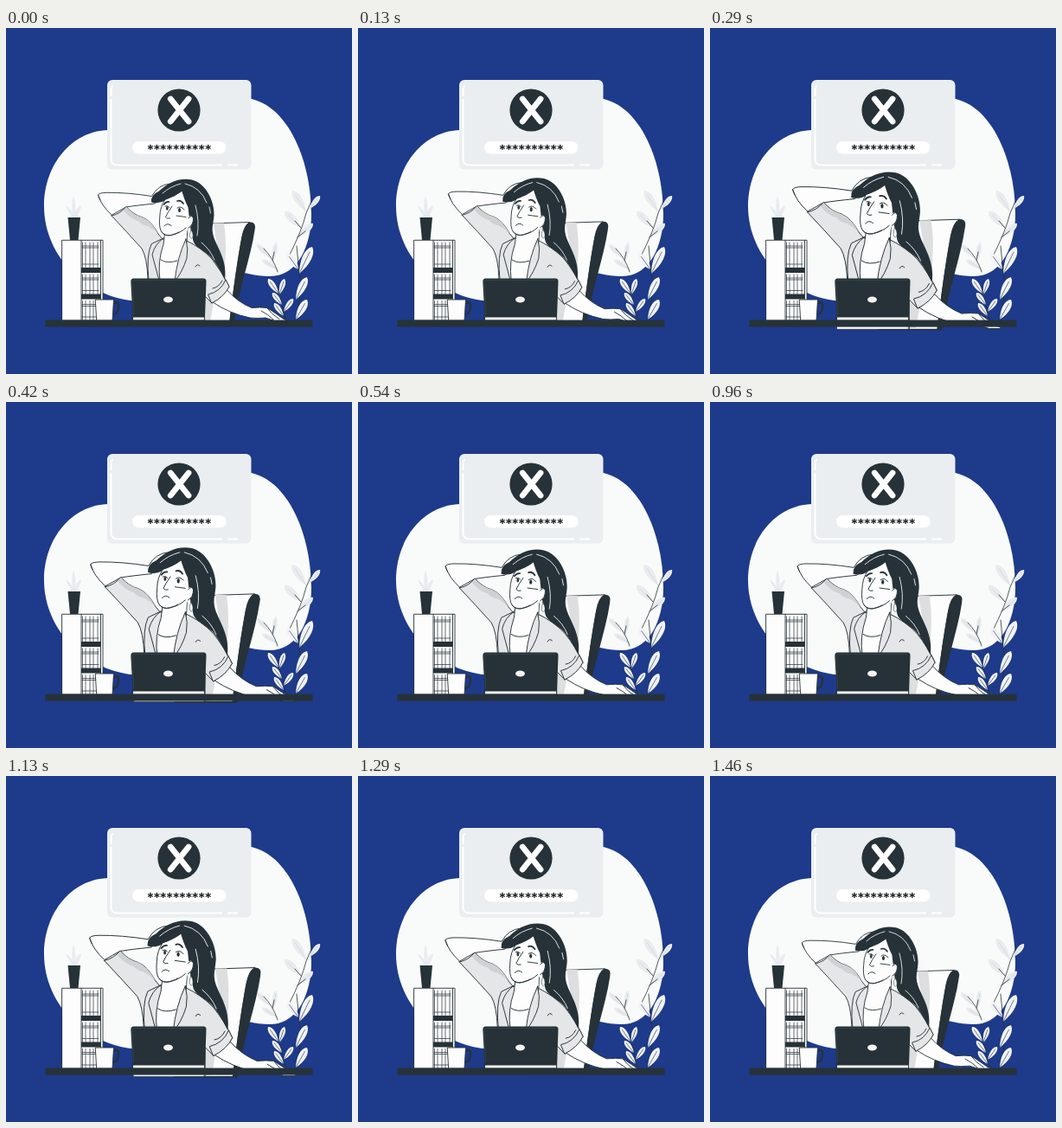
An HTML page for the animation above (1500 ms loop, 400 by 400 pixels).

```html
<!DOCTYPE html>
<html lang="en">
<head>
<meta charset="utf-8">
<title>Wrong password</title>
<style>
html, body { margin: 0; height: 100%; overflow: hidden; background: #1e3a8a; }
svg { display: block; width: 100vw; height: 100vh; }
.ink { fill: #263238; }
.pale { fill: #fdfdfd; }
.line { fill: none; }
.pale, .cloth, .line { stroke: #263238; stroke-width: .9; stroke-linecap: round; stroke-linejoin: round; }
.cloth { fill: #e5e6e7; }
.shade { fill: #cfd2d4; }
.shine { fill: none; stroke: #fff; stroke-width: .8; stroke-linecap: round; }
</style>
</head>
<body>
<svg viewBox="0 0 400 400" xmlns="http://www.w3.org/2000/svg">
  <rect width="400" height="400" fill="#1e3a8a"/>
  <path fill="#f9fbfa" d="M44 206C44 158 76 119 118 118C170 116 215 80 275 81C323 83 353 150 353 215C353 252 337 287 305 287C286 287 278 282 262 282C225 282 208 316 160 316C95 316 44 265 44 206Z"/>

  <g id="card">
    <rect x="117" y="60" width="166.500" height="103.500" rx="6" fill="#eaeef1"/>
    <path class="shine" style="stroke-width:2" d="M121.500 83V151Q121.500 158.500 129 158.500H249M257 158.500H267M121.500 78V71Q121.500 68 123 67"/>
    <circle class="ink" cx="200" cy="95" r="24.600"/>
    <path class="shine" style="stroke-width:6.800" d="M190.300 82L211 108M211 82L190.300 108"/>
    <rect x="146" y="131" width="108.500" height="14.400" rx="7.200" fill="#fff"/>
    <text x="163.300" y="143.800" font-family="'DejaVu Sans Mono', monospace" font-weight="700" font-size="12.300" fill="#1b2428" stroke="#1b2428" stroke-width=".3">**********</text>
  </g>

  <g id="plant"></g>

  <g id="shelf">
    <path fill="#e8ecf1" d="M77 219Q70 210 69 205Q75 209 77 214Q75 202 78 194Q81 203 80 213Q82 207 87 205Q86 213 81 219Z"/>
    <path class="ink" d="M71.500 219H86L83.500 245H74Z"/>
    <path class="pale" d="M65 245.300H112V338H65ZM87 245.300V338M109.500 245.300V338"/>
    <g id="books"></g>
    <path class="ink" d="M87 277H109.500V283H87ZM87 307.500H109.500V313.500H87Z"/>
  </g>

  <g id="her">
    <path class="pale" d="M236 226L282 224.500Q276 229 273 242C268 268 263 302 259 340H225Z"/>
    <path fill="#dcdedf" d="M240 225.500H252Q256 250 252 285L257 297L250 291Z"/>
    <path fill="#dcdedf" d="M229 311L240 317L236 339H229Z"/>
    <path class="ink" d="M281 224.500Q290 223.500 287.500 234C283 265 269 302 263.500 341H258C263 301 268 265 272.500 241Q275 228 281 224.500Z"/>

    <!-- raised arm -->
    <path class="pale" d="M139 207Q151 205 172 203L190 180Q176 181 168.500 194.500Q140 190 116 190.300Q108 190.500 106.500 193Q110 205 122 216Z"/>
    <path class="line" d="M106.500 193Q107 196 109 199"/>

    <!-- jacket and neck -->
    <path class="cloth" d="M122 217Q132 215 139 206.500Q147 216 158 219Q168 223 176 238L181 244L207 245Q226 254 238 267Q250 282 258 299Q251 311 238 318L229 309V340H162L164 290Q163 265 157 255Q140 236 122 217Z"/>
    <path class="shade" d="M139 207Q147 216 158 219Q168 223 176 238Q170 232 164 229Q157 228 153 223Q144 221 136 211Z"/>
    <path class="pale" d="M184 234L182 250Q175 270 178 292H197Q201 265 209 248L210 230Z"/>
    <path class="line" d="M179 268Q186 273 198 269"/>
    <path class="cloth" d="M182 243Q172 250 169 262L177 292H165Q162 262 168 250Z"/>
    <path class="cloth" d="M208 244Q211 255 209 266Q204 282 195 293Q198 265 208 244Z"/>
    <path class="line" d="M219 276Q221 272 224 275M239 301Q246 300 250 292"/>

    <!-- resting arm -->
    <path class="pale" d="M239 317Q249 311 255.500 303Q268 317 284 323.500Q294 322.500 302 323.500Q312 330 321 336.500Q326 338 325 339.300H313L300 335Q290 336 282 335Q258 330 239 317Z"/>
    <path class="line" d="M302 324Q307 331 316 336.500M295 327Q303 331 309 337"/>
    <path class="cloth" d="M234 308Q248 305 254 291L258 299Q252 311 238 318Z"/>

    <!-- head -->
    <path class="ink" d="M168 201.500Q167 193 177 188.500C187 179 200 172.500 215 175.500C231 179.500 241 200 240.500 216C240 226 237 231 240 241C244 254 256 268 253 291C249 283 244 273 237 265C227 255 214 253 216 239L205 205L185 199Q176 204 168 201.500Z"/>
    <path class="pale" d="M184 198Q178 207 177.800 218Q176.500 231 180 236Q184 241 191 239.500Q204 236 212 226L214 214Q211 196 204 188Q195 195 184 198Z"/>
    <path class="ink" d="M203 184Q196 195 182 199.500L177 196Q190 182 203 184ZM202 184Q206 199 210.500 207L212 221Q214 228 214 236L222 230L217 193Z"/>
    <path class="pale" d="M209.500 221Q214 214 216.500 220Q216.500 229 211 231Q208 236 209 243L200 236Z" style="stroke:none"/>
    <path class="line" d="M180 236Q184 241 191 239.500Q202 237 208 231M211 220Q215 215 216.500 220Q216.500 228 211 231"/>
    <path class="pale" style="stroke-width:.5" d="M214 233Q218 241 214.500 243.500Q210.500 242 214 233Z"/>
    <path class="line" style="stroke-width:1.700" d="M182.500 204Q185 200.500 188.500 201M198 200Q202 198.500 205 203"/>
    <path class="line" d="M192 206Q187 213 184.500 218.500Q186 221 189.500 220M183 229Q186.500 224.500 191 228.500M197 217L208 218.500M184 206Q187 204.500 189 207.500M198 208Q202 205 206 210"/>
    <ellipse class="ink" cx="186.300" cy="208.500" rx="1.300" ry="2.300"/>
    <ellipse class="ink" cx="200.500" cy="210.500" rx="1.500" ry="2.500"/>
    <path class="shine" d="M207 180Q225 184 232 202M235 207L236.500 214M202 180Q190 183 181 191M219 205Q224 224 221 240M226 248Q236 256 241 268"/>

    <path class="pale" style="stroke-width:.6" d="M153 334H228V340H153Z"/>
    <path class="ink" d="M196 340H263V341H196Z"/>
  </g>

  <g id="desk">
    <path class="line" style="stroke-width:2.200" d="M124 318.500Q130.300 314.500 130 322Q129.800 330.500 123.500 331.500"/>
    <path class="pale" d="M103.700 314H124.500L123 338H105Z"/>
    <path class="pale" d="M147 333H229.500V338H147Z"/>
    <path class="ink" d="M147.500 289.500H228.500Q231.500 289.500 231.500 293L230 334.500H146.500L144.300 293Q144.300 289.500 147.500 289.500Z"/>
    <path class="shine" style="stroke:#455057;stroke-width:.5" d="M147.500 331L146 294Q146 291.500 148 291.500H227"/>
    <ellipse cx="187.500" cy="314" rx="5.500" ry="3.500" fill="#f4f1f3"/>
    <rect class="ink" x="45.500" y="337.600" width="309" height="8"/>
  </g>
</svg>
<script>
const NS = 'http://www.w3.org/2000/svg';
const $ = id => document.getElementById(id);

function path(parent, d, fill, stroke, width) {
  const el = document.createElementNS(NS, 'path');
  const attrs = { d, fill, stroke, 'stroke-width': width, 'stroke-linecap': 'round' };
  for (const key in attrs) el.setAttribute(key, attrs[key]);
  parent.append(el);
}

// A leaf runs from its base to its tip, bulging by w on both sides.
function leaf(x, y, tx, ty, w, fill, vein) {
  const dx = tx - x, dy = ty - y, len = Math.hypot(dx, dy);
  const nx = -dy / len * w, ny = dx / len * w;
  const at = (part, side) => `${x + dx * part + nx * side} ${y + dy * part + ny * side}`;
  const d = `M${x} ${y}C${at(.45, 1)} ${at(.85, 1)} ${tx} ${ty}C${at(.85, -1)} ${at(.45, -1)} ${x} ${y}Z`;
  path($('plant'), d, fill, 'none', 0);
  path($('plant'), `M${x} ${y}L${at(.8, 0)}`, 'none', vein, .7);
}

const far = [
  [347, 212, 331, 188, 6], [351, 209, 363, 194, 4], [341, 231, 322, 212, 6],
  [337, 242, 355, 226, 5], [304, 265, 290, 250, 4], [309, 269, 312, 248, 4],
  [314, 279, 296, 268, 4]
];
const near = [
  [339, 284, 354, 253, 7], [338, 279, 325, 261, 6], [335, 314, 348, 288, 6],
  [335, 337, 348, 314, 6], [315, 307, 303, 290, 4.5], [316, 308, 322, 290, 4],
  [319, 320, 308, 306, 4], [321, 333, 310, 318, 4], [321, 328, 332, 313, 4]
];
far.forEach(l => leaf(...l, '#e9ecef', '#cdd3da'));
path($('plant'), 'M326 266Q342 235 347 214L354 198M341 231L334 223M337 242L346 235M314 282Q309 266 298 255M308 268L310 259', 'none', '#263238', .8);
path($('plant'), 'M336 337Q343 300 339 283L336 252M323 337Q318 315 314 298', 'none', '#263238', .8);
near.forEach(l => leaf(...l, '#f1f3f5', '#34436a'));

for (const [top, bottom] of [[246, 277], [283, 307.5], [313.5, 338]]) {
  const rows = [top + 6, top + 8, bottom - 4].map(y => `M88 ${y}H107`).join('');
  const spines = [88.500, 92, 97, 101, 106].map(x => `M${x} ${top + 2}V${bottom}`).join('');
  path($('books'), spines + rows, 'none', '#263238', .7);
}

const LOOP = 1500, STEPS = 36, STEP = LOOP / STEPS;

// Quick swell, slower linear release; the second half mirrors the first.
function swell(k) {
  const m = Math.min(k, STEPS - k);
  return m < 8 ? Math.min(1, (m / 7) ** 2) : (18 - m) / 10;
}

function draw(now) {
  const k = Math.floor((now % LOOP + 4) / STEP) % STEPS;
  const s = 1 + .1 * swell(k);
  $('her').setAttribute('transform', `translate(216 257.500) scale(${s}) translate(-216 -257.500)`);
}

const start = performance.now();
function tick() {
  draw(performance.now() - start);
  requestAnimationFrame(tick);
}
draw(0);
requestAnimationFrame(tick);
</script>
</body>
</html>
```
